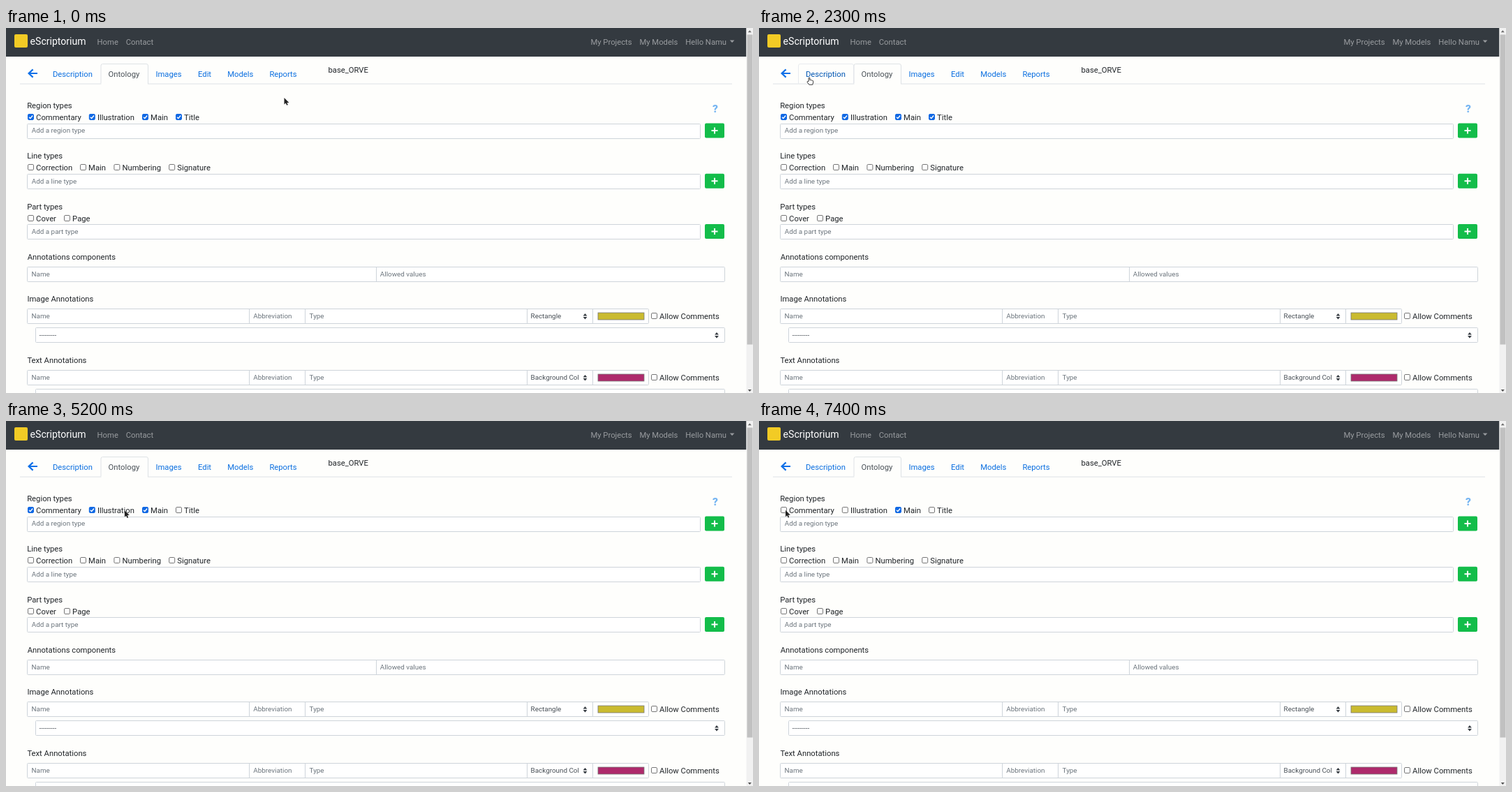
These frames come from a looping animation (1070 by 523 pixels, 8000 ms). An HTML page:

```html
<!DOCTYPE html>
<html lang="en">
<head>
<meta charset="utf-8">
<title>Ontology</title>
<style>
html, body { margin: 0; width: 100%; height: 100%; overflow: hidden; background: #fefefc; }
svg { display: block; font-family: Roboto, sans-serif; font-size: 11.25px; }
text { white-space: pre; }
</style>
</head>
<body>
<svg id="stage" width="1070" height="523" viewBox="0 0 1070 523"></svg>
<script>
const NS = 'http://www.w3.org/2000/svg';
const stage = document.getElementById('stage');
const INK = '#212529', MUTED = '#6c757d', LINE = '#ced4da', LINK = '#0b6fe0';

function add(tag, attrs, parent = stage) {
  const node = document.createElementNS(NS, tag);
  for (const key in attrs) node.setAttribute(key, attrs[key]);
  return parent.appendChild(node);
}
function rect(x, y, width, height, fill, more) {
  return add('rect', { x, y, width, height, fill, ...more });
}
function path(d, fill, more, parent) {
  return add('path', { d, fill, ...more }, parent);
}
function label(x, y, str, fill = INK, size = 11.25) {
  const node = add('text', { x, y, fill, 'font-size': size });
  node.textContent = str;
  return node;
}
const small = (x, y, str, fill = MUTED) => label(x, y, str, fill, 9.87);
const field = (x, y, w, h) => rect(x, y, w, h, '#fff', { stroke: LINE, rx: 1 });

function checkbox(x, y, str) {
  const box = rect(x + .5, y + .5, 8, 8, '#fff', { stroke: '#767676', rx: 1.4 });
  const tick = path(`M${x + 2} ${y + 4.7}l1.8 1.8 3.4 -4`, 'none',
    { stroke: '#fff', 'stroke-width': 1.4, visibility: 'hidden' });
  label(x + 12.1, y + 9, str);
  return (on, hover) => {
    const blue = hover ? '#1c53a5' : '#1169e4';
    box.setAttribute('fill', on ? blue : '#fff');
    box.setAttribute('stroke', on ? blue : hover ? '#4f4f4f' : '#767676');
    tick.setAttribute('visibility', on ? 'visible' : 'hidden');
  };
}
function sorter(x, y) {
  path(`M${x - 2.9} ${y - .8}h5.8l-2.9 -3.4zM${x - 2.9} ${y + .8}h5.8l-2.9 3.4z`, '#343a40');
}

// navigation bar
rect(0, 0, 1060.5, 41, '#343a40');
rect(12, 9, 19, 19, '#f2cb25', { rx: 2 });
label(34.6, 24, 'eScriptorium', '#fff', 14.05);
[[130.6, 'Home'], [171.8, 'Contact'], [837.4, 'My Projects'], [907.4, 'My Models'], [973.2, 'Hello Namu']]
  .forEach(([x, str]) => label(x, 24, str, '#999c9f'));
path('M1036.8 17.5h6.6l-3.3 3.5z', '#999c9f');

// tabs
const TAB_SHAPE = (x, w) => `M${x} 80V54q0 -2.5 2.5 -2.5h${w - 5}q2.5 0 2.5 2.5V80`;
path('M20 80H1040', 'none', { stroke: '#dee2e6' });
path('M38.6 59.4L32.6 65l6 5.6M33 65H45', 'none', { stroke: '#1070e8', 'stroke-width': 2.2 });
const tabs = [[56.5, 79, 66.9, 'Description'], [204, 59, 214.4, 'Images'], [264, 42, 275, 'Edit'],
  [306.5, 59, 317.2, 'Models'], [367, 60, 377.4, 'Reports']].map(([x, w, tx, str]) => ({
  x, w,
  edge: path(TAB_SHAPE(x, w), 'none', { stroke: '#e9ecef' }),
  text: label(tx, 70, str, LINK)
}));
path(TAB_SHAPE(136, 67.5), '#fefefc', { stroke: '#dee2e6' });
rect(136.5, 79, 66.5, 2, '#fefefc');
label(146.6, 70, 'Ontology', '#495057');
label(461.5, 63.6, 'base_ORVE');

// type groups
const groups = [
  [111, 'region', [[31, 'Commentary'], [118.8, 'Illustration'], [195, 'Main'], [243, 'Title']]],
  [183.3, 'line', [[31, 'Correction'], [106, 'Main'], [154.4, 'Numbering'], [233.2, 'Signature']]],
  [255.6, 'part', [[31, 'Cover'], [83, 'Page']]]
].map(([y, kind, items]) => {
  label(30.2, y + 4, kind[0].toUpperCase() + kind.slice(1) + ' types');
  field(30.5, Math.round(y + 25.5) - .0 + .5, 964, 21);
  small(36.8, y + 39.2, `Add a ${kind} type`);
  rect(1001, y + 25.5, 28, 21, '#13bd4a', { rx: 2 });
  path(`M1010.5 ${y + 36}h9m-4.5 -4.5v9`, 'none', { stroke: '#fff', 'stroke-width': 2 });
  return items.map(([x, str]) => checkbox(x, Math.round(y + 12), str));
});
const boxes = groups[0];
add('text', { x: 1016, y: 120.5, fill: '#75b5f2', 'font-size': 15.5, 'font-weight': 900, 'text-anchor': 'middle' })
  .textContent = '?';

// annotations
label(30.7, 332, 'Annotations components');
field(30.5, 342.5, 999, 21);
path('M530.5 342v22', 'none', { stroke: LINE });
small(36.5, 356, 'Name');
small(535.8, 356, 'Allowed values');

function annotation(y, title, shape, color) {
  label(30.4, y - 9.6, title);
  field(30.5, y + .5, 890, 21);
  [348.5, 428.5, 746.5, 840.5].forEach(x => path(`M${x} ${y}v22`, 'none', { stroke: LINE }));
  [[36.5, 'Name'], [354.3, 'Abbreviation'], [434.6, 'Type']].forEach(([x, str]) => small(x, y + 14, str));
  small(751.6, y + 14, shape, '#495057');
  sorter(829.5, y + 11.2);
  rect(848, y + 6, 66, 10, color, { stroke: '#777', 'stroke-width': .8 });
  checkbox(924, y + 6, 'Allow Comments')(false, false);
  field(42.5, y + 27.5, 987, 21);
}
annotation(402, 'Image Annotations', 'Rectangle', '#cabb30');
small(47.6, 443.4, '---------', '#495057');
sorter(1018, 440.3);
annotation(490, 'Text Annotations', 'Background Col', '#ae2a6c');

// scrollbar
rect(1060.5, 0, 9.5, 523, '#f1f1f1');
rect(1061.5, 9.5, 8, 444, '#c1c1c1');
path('M1062.8 6.3h5l-2.5 -3z', '#6b6b6b');
path('M1062.8 518h5l-2.5 3z', '#505050');

// pointers
const pointer = add('g', {});
const arrow = path('M0 0V9.4L2.2 7.5L3.7 10.8L5.3 10.1L3.9 6.9H6.9Z', '#222',
  { stroke: '#fff', 'stroke-width': .7, 'paint-order': 'stroke' }, pointer);
const hand = path('M-.9 5.6V1Q-.9 0 0 0T.9 1V3.6Q1.8 2.9 2.7 3.9Q3.6 3.3 4.3 4.3Q5.6 4 5.6 5.4V7.2L4.7 10.2H-.2L-2.9 6.7Q-3 5.2 -1.8 5.3Z',
  '#fff', { stroke: '#222', 'stroke-width': .9 }, pointer);

// pointer path: time in units of 100 ms, x, y
const route = [
  [4, 398.5, 100], [8, 200, 93], [11, 70, 91], [13, 1, 107], [15, 1, 107], [17, 235, 198], [18, 235, 198],
  [20, 75, 170], [21, 1, 130], [22, 18, 92], [23, 72, 71], [25, 330, 68], [26, 260, 148], [27, 95, 195],
  [28, 160, 182], [30, 317.5, 134], [31, 317.5, 134], [33, 250, 109], [34, 235, 125], [35, 235, 125],
  [36, 245, 125], [40, 245, 125], [43, 236.5, 127], [45, 208, 128], [47, 208, 128], [49, 198.5, 128],
  [50, 198.5, 128], [55, 127, 128.5], [56, 127, 128.5], [58, 124.7, 127.5], [64, 124.7, 127.5],
  [66, 48, 130], [67, 48, 130], [68, 46, 130], [69, 46, 130], [74, 38, 127.8], [80, 38, 127.8]
];
function locate(n) {
  const i = route.findIndex(p => p[0] >= n);
  if (i <= 0) return route[0].slice(1);
  const [t0, x0, y0] = route[i - 1], [t1, x1, y1] = route[i];
  const k = (n - t0) / (t1 - t0);
  return [x0 + (x1 - x0) * k, y0 + (y1 - y0) * k];
}

// per region box: hover start, hover end, time it is cleared
const states = [[66, 74, 72], [54, 58, 57], [42, 52, 99], [36, 42, 36]];

function draw(ms) {
  const n = Math.floor(ms % 8000 / 100);
  const [x, y] = locate(n);
  let onTab = false;
  tabs.forEach(tab => {
    const over = y > 51 && y < 80 && x > tab.x && x < tab.x + tab.w;
    onTab = onTab || over;
    tab.edge.setAttribute('visibility', over ? 'visible' : 'hidden');
    tab.text.setAttribute('fill', over ? '#0056b3' : LINK);
  });
  boxes.forEach((set, i) => {
    const [from, to, off] = states[i];
    set(n < off, n >= from && n < to);
  });
  pointer.setAttribute('transform', `translate(${x} ${y})`);
  arrow.setAttribute('visibility', onTab ? 'hidden' : 'visible');
  hand.setAttribute('visibility', onTab ? 'visible' : 'hidden');
}
const start = performance.now();
function tick(now) {
  draw(Math.max(0, now - start));
  requestAnimationFrame(tick);
}
draw(0);
requestAnimationFrame(tick);
</script>
</body>
</html>
```
